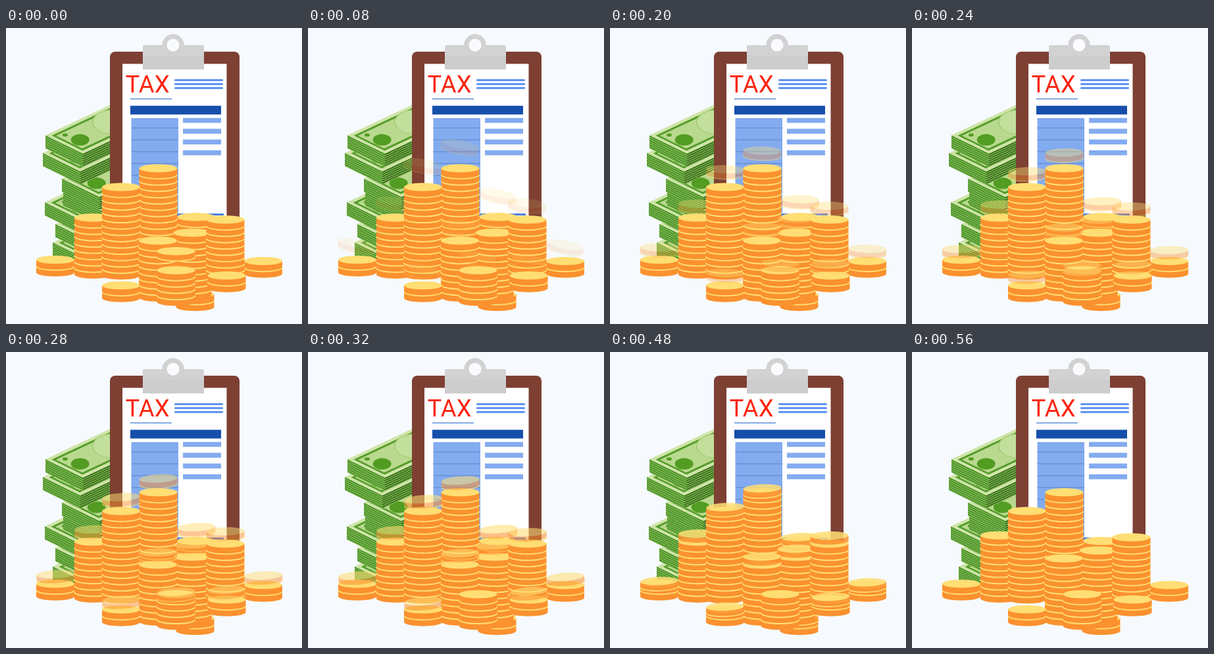
These frames come from a looping animation (450x450 px, 1200 ms). An HTML page:

```html
<!DOCTYPE html>
<html lang="en">
<head>
<meta charset="utf-8">
<title>Tax savings</title>
<style>
  html, body { margin: 0; width: 100%; height: 100%; overflow: hidden; background: #f6faff; }
  svg { display: block; width: 100vw; height: 100vh; }
  text { font: 36.5px Roboto, "Liberation Sans", sans-serif; }
</style>
</head>
<body>
<svg viewBox="0 0 450 450">
  <g id="cash"></g>
  <rect x="158" y="36" width="197" height="310" rx="8" fill="#7d4033"/>
  <rect x="177" y="54.5" width="158.500" height="260" fill="#fff"/>
  <circle cx="254" cy="26" r="13" fill="none" stroke="#d2d2d2" stroke-width="7.5"/>
  <circle cx="254" cy="26" r="9.5" fill="#f9fbff"/>
  <path d="M208 29q0-3 3-3h27a16 16 0 0 0 32 0h28q3 0 3 3v34h-93z" fill="#d2d2d2"/>
  <path d="M208 43h93v20h-93z" fill="#cdcdcd"/>
  <text x="181.5" y="98" fill="#fc2410">TAX</text>
  <path d="M189 107.7h63" stroke="#5f90dd" stroke-width="1.4"/>
  <path d="M189 118.300h138v13.200h-138z" fill="#164eab"/>
  <path d="M190.500 137h71.500v150h-71.500z" fill="#83abf0"/>
  <path d="M190 283.500h141" stroke="#4b7fe0" stroke-width="3"/>
  <g id="rows"></g>
  <g id="coins"></g>
</svg>
<script>
const LOOP = 1200, FALL = 560, STEP = 40;
const RX = 29, RY = 6.3, PITCH = 9.6;
const YELLOW = '#ffde73', ORANGE = '#fb912f';
const [cash, rows, coins] = ['cash', 'rows', 'coins'].map(id => document.getElementById(id));

function add(parent, tag, attrs = {}) {
  const el = document.createElementNS('http://www.w3.org/2000/svg', tag);
  for (const k in attrs) el.setAttribute(k, attrs[k]);
  parent.append(el);
  return el;
}

// Form: evenly spaced rows
function ruled(n, x, y, gap, width, weight, stroke, cap = 'butt') {
  for (let i = 0; i < n; i++) {
    add(rows, 'path', {
      d: `M${x} ${y + i * gap}h${width}`, stroke, 'stroke-width': weight, 'stroke-linecap': cap
    });
  }
}
ruled(3, 257.5, 79.3, 6, 71, 3, '#5a8ff0', 'round');
ruled(6, 190.5, 152, 18, 71.5, 1, '#5c83c4');
ruled(4, 269, 140.5, 16.4, 58, 7.5, '#83abf0');

// Banknote bundle; u runs along the front edge, v along the right edge
function bundle(x, y, h = 20) {
  const at = (u, v) => [x + u * 57 + v * 98, y + u * 28 - v * 46];
  const poly = (pts, fill) => add(cash, 'polygon', { points: pts.join(' '), fill });
  const oval = (u, v, size, fill) => {
    const [cx, cy] = at(u, v);
    add(cash, 'ellipse', { cx, cy, rx: size, ry: size * .62, fill });
  };
  const side = (a, b, fill) => poly([a, b, [b[0], b[1] + h], [a[0], a[1] + h]], fill);
  const face = (edge, fill) =>
    poly([at(edge, edge / 2), at(1 - edge, edge / 2), at(1 - edge, 1), at(edge, 1)], fill);
  const left = at(0, 0), front = at(1, 0), right = at(1, 1);

  side(left, front, '#4b9425');
  side(front, right, '#3a7319');
  for (let d = 3; d < h; d += 3.3) {
    add(cash, 'path', {
      d: `M${left}L${front}L${right}`, transform: `translate(0 ${d})`,
      fill: 'none', stroke: '#9cc673'
    });
  }
  face(0, '#cfe5a8');
  face(.09, '#559c2b');
  face(.15, '#b9d98f');
  oval(.5, .74, 30, '#9fca70');
  oval(.5, .74, 28.5, '#c3df9c');
  oval(.58, .2, 14, '#529c22');
  oval(.25, .16, 4, '#529c22');
}
[[71, 326], [75, 298], [59, 265], [87, 250], [85, 229], [56, 190], [60, 163]]
  .forEach(([x, y]) => bundle(x, y));

// Coins
const arc = y => `A${RX} ${RY} 0 0 0 ${RX} ${y}`;

function pile(x, y, n, lip = 0) {
  const g = add(coins, 'g', { transform: `translate(${x} ${y})` });
  const h = n * PITCH;
  add(g, 'path', { d: `M${-RX} 0V${h}${arc(h)}V0z`, fill: ORANGE });
  for (let i = 1; i < n + lip; i++) {
    const d = i * PITCH - lip;
    add(g, 'path', { d: `M${-RX} ${d}${arc(d)}`, fill: 'none', stroke: YELLOW, 'stroke-width': 2 });
  }
  add(g, 'ellipse', { rx: RX, ry: RY, fill: YELLOW });
  return g;
}

// Back to front: left, top, coins, whether the pile grows, landing time
const piles = [
  [260, 281, 9], [46, 346, 2], [362, 348, 2], [104, 282, 9, 1],
  [202.5, 207, 12], [146, 235.5, 14], [258.5, 398.5, 2], [254.5, 305, 10, 1],
  [304.5, 285, 9, 1], [202, 317, 9, 1], [229.5, 362, 5, 0, 320],
  [306.5, 370, 2], [146, 385, 2]
];

const drops = piles.map(([left, top, n, grows = 0, land = FALL]) => {
  const x = left + RX, y = top + RY;
  pile(x, y, n);
  const end = y - grows * PITCH;
  return {
    el: pile(x, end, 1, 1), x, end, grows, land,
    height: grows ? 18 : top < 300 ? 42 : 29,
    tilt: grows ? .5 : 1
  };
});

function draw(t) {
  const now = Math.min(FALL, Math.floor(t / STEP) * STEP);
  const p = now / FALL;
  const swing = 16 * (1 - p) * Math.cos(3.9 * p);
  for (const d of drops) {
    const left = Math.max(0, 1 - now / d.land);
    const early = d.land < FALL;
    const angle = left && !(early && !now) ? swing * d.tilt : 0;
    const alpha = early && !now ? 1 : left || d.grows ? p : 0;
    d.el.setAttribute('opacity', alpha);
    d.el.setAttribute('transform', `translate(${d.x} ${d.end - d.height * left}) rotate(${angle})`);
  }
}

const start = performance.now();
function tick() {
  draw((performance.now() - start) % LOOP);
  requestAnimationFrame(tick);
}
draw(0);
requestAnimationFrame(tick);
</script>
</body>
</html>
```
